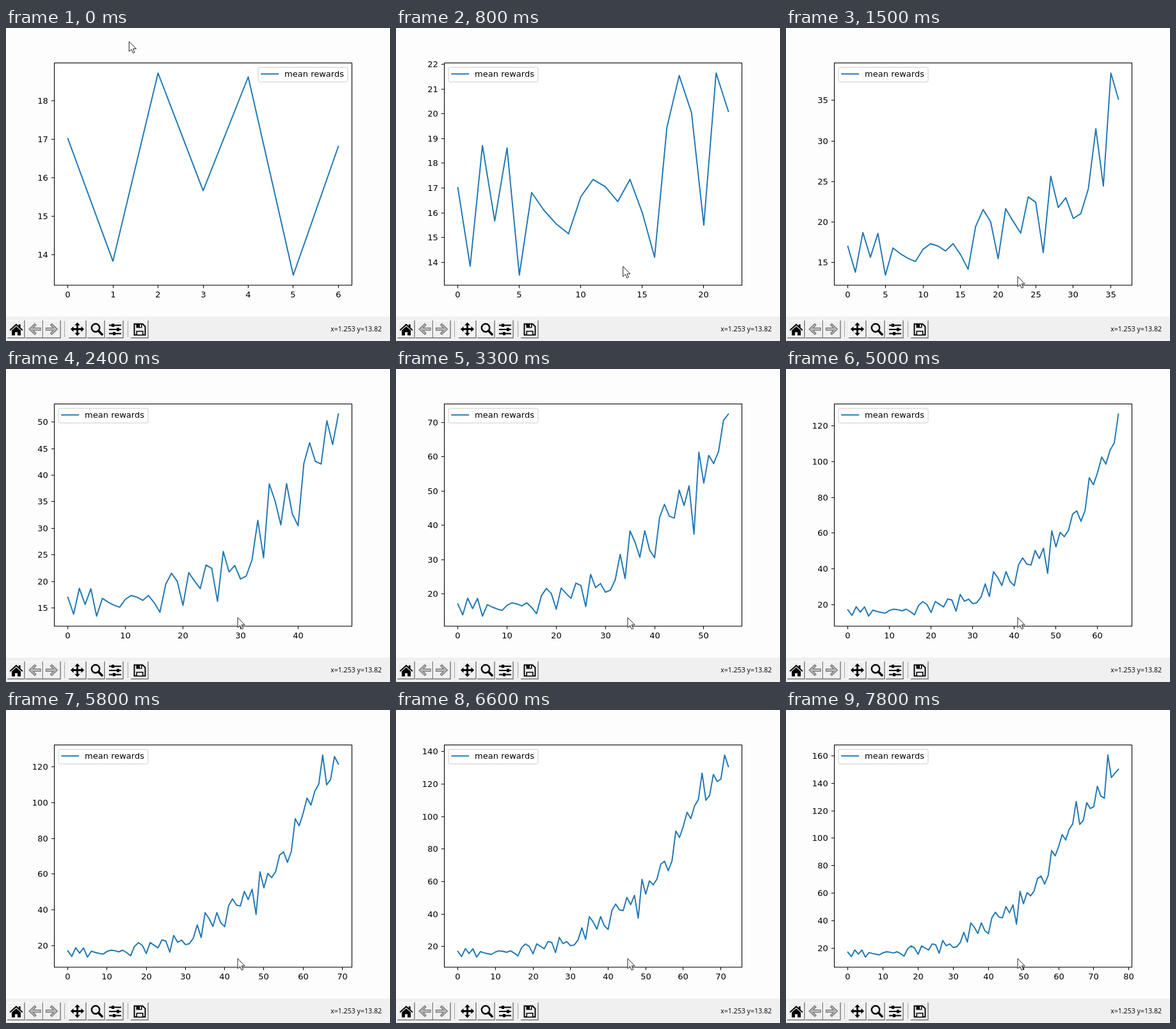
An HTML page that plays this animation: 600 by 488 pixels, repeating every 8000 ms.

```html
<!DOCTYPE html>
<html>
<head>
<meta charset="utf-8">
<style>
html, body { margin: 0; height: 100%; overflow: hidden; background: #fefdfe; }
svg { display: block; width: 600px; height: 488px; }
text { font: 13.02px "DejaVu Sans", sans-serif; }
.status { font: 10.6px "Open Sans", sans-serif; text-anchor: end; }
.data { fill: none; stroke: #1f77b4; stroke-width: 1.95; stroke-linejoin: round; stroke-linecap: square; }
.axis { fill: none; stroke: #000; stroke-width: 1.05; }
.thick { fill: none; stroke: #000; stroke-width: 2.4; }
</style>
</head>
<body>
<svg viewBox="0 0 600 488">
  <rect width="600" height="488" fill="#fefdfe"/>
  <rect x="75.5" y="54.5" width="465" height="346.5" fill="#fff"/>
  <path id="line" class="data"/>
  <rect class="axis" x="75.5" y="54.5" width="465" height="346.5"/>
  <path id="ticks" class="axis"/>
  <g id="labels"></g>
  <g id="legend">
    <rect x=".3" y="0" width="140" height="22.8" rx="2.6" fill="#fff" fill-opacity=".8" stroke="#ccc"/>
    <path class="data" d="M5.5 10.3h26"/>
    <text x="41.4" y="15">mean rewards</text>
  </g>

  <rect y="450" width="600" height="38" fill="#f0f0f0"/>
  <g id="buttons"></g>
  <path d="M91.5 457v25M190.5 457v25" stroke="#aaa"/>
  <path d="M5.5 470.5 16 461l3.8 3.4V462h2.8v5l3.9 3.5-1.3 1.5L16 463.8 6.8 472zM9 471.5l7-6.2 7 6.2v7.8h-5v-5h-4v5H9z"/>
  <g id="arrow" fill="#b8b8b8" stroke="#777" stroke-width="1.2">
    <path id="back" d="m45 461-9 8.500 9 8.500 2-2-4.500-4.500H54v-4H42.500L47 463z"/>
    <use href="#back" transform="matrix(-1 0 0 1 116.500 0)"/>
  </g>
  <path d="m111.500 459 4.300 4.600h-2.900v4.500h4.600v-2.900l4.600 4.300-4.600 4.300v-2.900h-4.600v4.500h2.900l-4.300 4.600-4.300-4.600h2.900v-4.500h-4.600v2.900l-4.600-4.300 4.600-4.300v2.900h4.600v-4.500h-2.900z"/>
  <circle class="thick" cx="140" cy="467.500" r="6.200"/>
  <path d="m144.500 472 5.500 5.700" stroke="#000" stroke-width="3.600" stroke-linecap="round"/>
  <path d="M161 463.500h19M161 470h19M161 476.500h19" stroke="#000" stroke-width="1.800"/>
  <path d="M165 461h4v5h-4zM173 467.500h4v5h-4zM167 474h4v5h-4z"/>
  <path d="M200.500 461.500h13l4 4v13h-17z" fill="none" stroke="#000" stroke-width="1.900"/>
  <path d="M203.500 461h9v6.500h-9zM203.500 472h11v7h-11z"/>
  <path d="M209 462.300h2v4h-2zM205 473.500h8v4.500h-8z" fill="#f0f0f0"/>
  <text class="status" x="587" y="472.500">x=1.253 y=13.82</text>

  <path id="cursor" d="M0 0v15.700l3.700-3.400 2.500 5.800 2.500-1.100-2.500-5.600h5z" fill="#fff" stroke="#222" stroke-width="1"/>
</svg>
<script>
const $ = id => document.getElementById(id);

const rewards = [
  17.02, 13.84, 18.72, 15.67, 18.62, 13.48, 16.82, 16.1, 15.55, 15.15,
  16.65, 17.35, 17.05, 16.45, 17.35, 16, 14.2, 19.45, 21.55, 20.05,
  15.5, 21.65, 20.1, 18.65, 23.1, 22.45, 16.25, 25.65, 21.8, 23,
  20.45, 21.05, 24.1, 31.5, 24.45, 38.35, 35.15, 30.65, 38.4, 32.7,
  30.5, 42.2, 46.1, 42.6, 42.1, 50.25, 45.75, 51.5, 37.4, 61.3,
  52.3, 60.4, 58, 61.5, 70.6, 72.45, 66.6, 72.7, 91, 87.1,
  94, 102.6, 98.7, 106.5, 110.4, 126.7, 110, 113, 125.9, 121.6,
  123, 137.8, 130.7, 129.1, 160.5, 144.1, 147.3, 150.2
];

// Longer episodes score higher, so each new point takes time in proportion to its reward.
let clock = 145;
const shownAt = rewards.map((v, i) => i < 7 ? 0 : clock += 9 + 1.7 * v);

const box = { left: 75.5, right: 540.5, top: 54.5, bottom: 401 };

function axis(min, max, from, to) {
  const pad = (max - min) * .05, lo = min - pad, hi = max + pad;
  const raw = (hi - lo) / 9, mag = 10 ** Math.floor(Math.log10(raw));
  const step = [1, 2, 2.5, 5, 10].find(s => s * mag >= raw - 1e-9) * mag;
  const ticks = [];
  for (let k = Math.ceil(lo / step); k * step <= hi; k++) ticks.push(k * step);
  return {
    ticks,
    at: v => from + (v - lo) / (hi - lo) * (to - from),
    label: v => v.toFixed(step % 1 ? 1 : 0)
  };
}

function drawChart(last) {
  const data = rewards.slice(0, last + 1);
  const x = axis(0, last, box.left, box.right);
  const y = axis(Math.min(...data), Math.max(...data), box.bottom, box.top);
  $('line').setAttribute('d', 'M' + data.map((v, i) => `${x.at(i).toFixed(2)} ${y.at(v).toFixed(2)}`).join('L'));
  let marks = '', labels = '';
  for (const v of x.ticks) {
    const p = Math.round(x.at(v) - .5) + .5;
    marks += `M${p} ${box.bottom}v4.6`;
    labels += `<text x="${p}" y="420" text-anchor="middle">${x.label(v)}</text>`;
  }
  for (const v of y.ticks) {
    const p = Math.round(y.at(v) - .5) + .5;
    marks += `M${box.left} ${p}h-4.6`;
    labels += `<text x="65.7" y="${p + 4.7}" text-anchor="end">${y.label(v)}</text>`;
  }
  $('ticks').setAttribute('d', marks);
  $('labels').innerHTML = labels;
  $('legend').setAttribute('transform', `translate(${last < 17 ? 393.7 : 81.7} 61.300)`);
}

$('buttons').innerHTML = [2, 30.5, 58, 98, 127, 156, 195].map(x => `
  <path d="M${x + .5} 483V456.500h26" fill="none" stroke="#fff"/>
  <path d="M${x} 483.200h27V456" fill="none" stroke="#777" stroke-width="1.400"/>`).join('');

let drawn = -1;
function frame(now) {
  const t = Math.floor(now % 8000 / 100) * 100;
  const last = shownAt.filter(s => s <= t).length - 1;
  if (last !== drawn) drawChart(drawn = last);
  const u = Math.min(1, Math.max(0, (t - 100) / 800)), e = u * u * (3 - 2 * u);
  $('cursor').setAttribute('transform', `translate(${192.3 + 169.7 * e} ${21 + 366.5 * e})`);
  requestAnimationFrame(frame);
}
frame(0);
</script>
</body>
</html>
```
